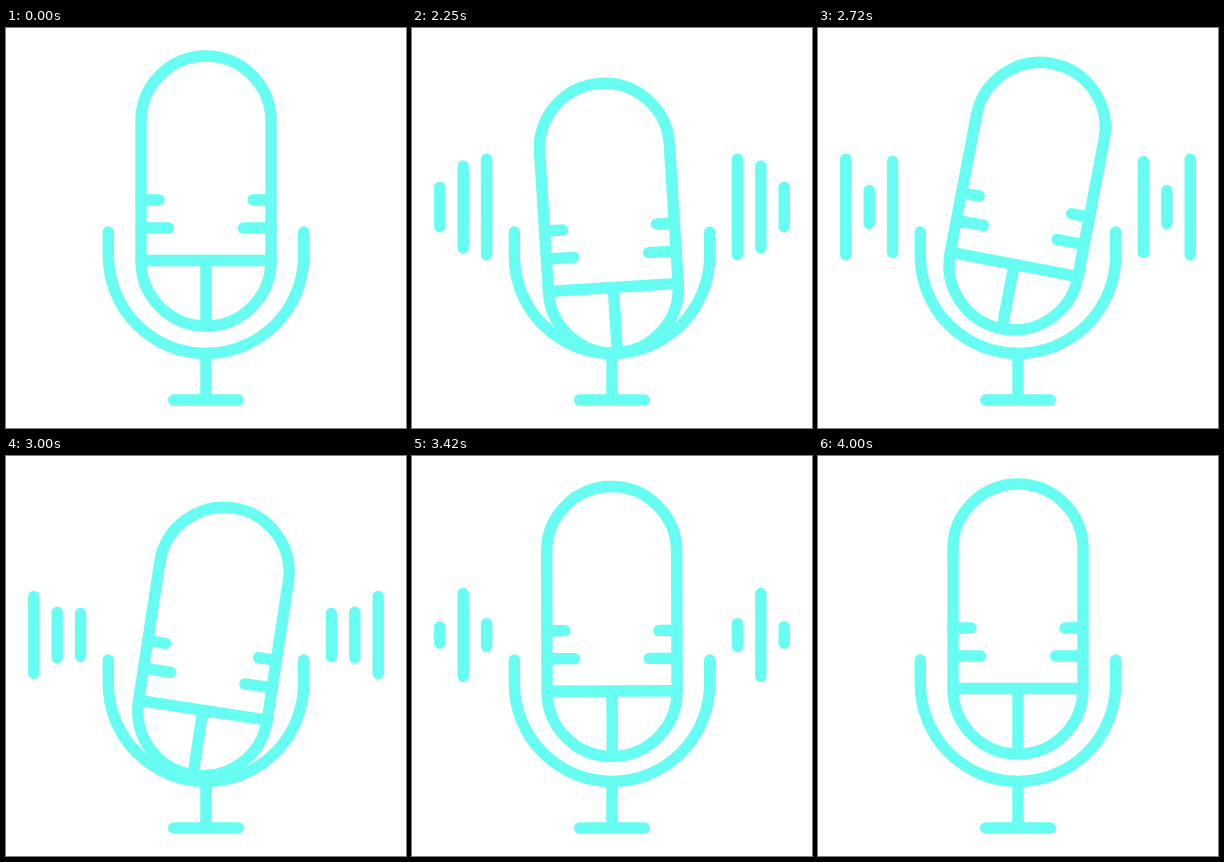
These frames come from a looping animation (400 px wide and 400 px high, 4.02 s). An HTML page:

```html
<!DOCTYPE html>
<html lang="en">
<head>
<meta charset="utf-8">
<title>Microphone</title>
<style>
  html, body { margin: 0; width: 100%; height: 100%; overflow: hidden; background: #fff; }
  svg { display: block; width: 100vw; height: 100vh; }
  path { fill: none; stroke: #68fdf3; stroke-width: 11.4; stroke-linecap: round; }
</style>
</head>
<body>
<svg viewBox="0 0 400 400">
  <path d="M102.3 204V227.5A97.7 98 0 0 0 297.7 227.5V204M200 325.5V372M167.7 372H232.3"/>
  <g id="mic">
    <path d="M135 93A65 65 0 0 1 265 93V233A65 65 0 0 1 135 233Z"/>
    <path d="M135 232.5H265M200 232.5V298"/>
    <path d="M135 172H153M135 200H162.500M265 172H247M265 200H237.500"/>
  </g>
  <path id="sound"/>
</svg>
<script>
  const LOOP = 4020, START = 2020, END = 4000, BAR_Y = 179;
  const mic = document.getElementById("mic");
  const sound = document.getElementById("sound");
  const clamp = x => Math.min(1, Math.max(0, x));

  // Sine ease between [time, value] turning points.
  const sway = (...keys) => t => {
    let i = 1;
    while (i < keys.length - 1 && t > keys[i][0]) i++;
    const [t0, a] = keys[i - 1], [t1, b] = keys[i];
    return a + (b - a) * (1 - Math.cos(Math.PI * clamp((t - t0) / (t1 - t0)))) / 2;
  };
  const drop = sway([1960, 0], [2256, 27], [2586, -8.5], [2916, 27], [3260, -8.2], [3560, 11], [3950, 0]);
  const tilt = sway([1960, 0], [2190, -5], [2510, 10.8], [2800, 10.8], [3520, -0.7], [4000, 0]);

  // Each pair of bars pulses as a cosine; x is the distance from the middle.
  const bars = [
    { x: 172.2, mean: 26.5, amp: 21.5, peak: 2745, period: 1640 },
    { x: 148.8, mean: 28.6, amp: 13, peak: 3390, period: 1200 },
    { x: 125.4, mean: 32, amp: 23.5, peak: 2470, period: 1640 }
  ];
  const volume = t => clamp((t - 2000) / 110) * clamp((END - t) / 300);

  function barPair({ x, mean, amp, peak, period }, t) {
    const half = volume(t) * (mean + amp * Math.cos(2 * Math.PI * (t - peak) / period));
    return [200 - x, 200 + x].map(cx => `M${cx} ${BAR_Y - half}V${BAR_Y + half}`).join("");
  }

  function draw(t) {
    const live = t >= START && t < END;
    mic.setAttribute("transform", live ? `translate(0 ${drop(t)}) rotate(${tilt(t)} 200 212)` : "");
    sound.setAttribute("d", live ? bars.map(bar => barPair(bar, t)).join("") : "");
  }

  const began = performance.now();
  function tick() {
    draw((performance.now() - began) % LOOP);
    requestAnimationFrame(tick);
  }
  tick();
</script>
</body>
</html>
```
